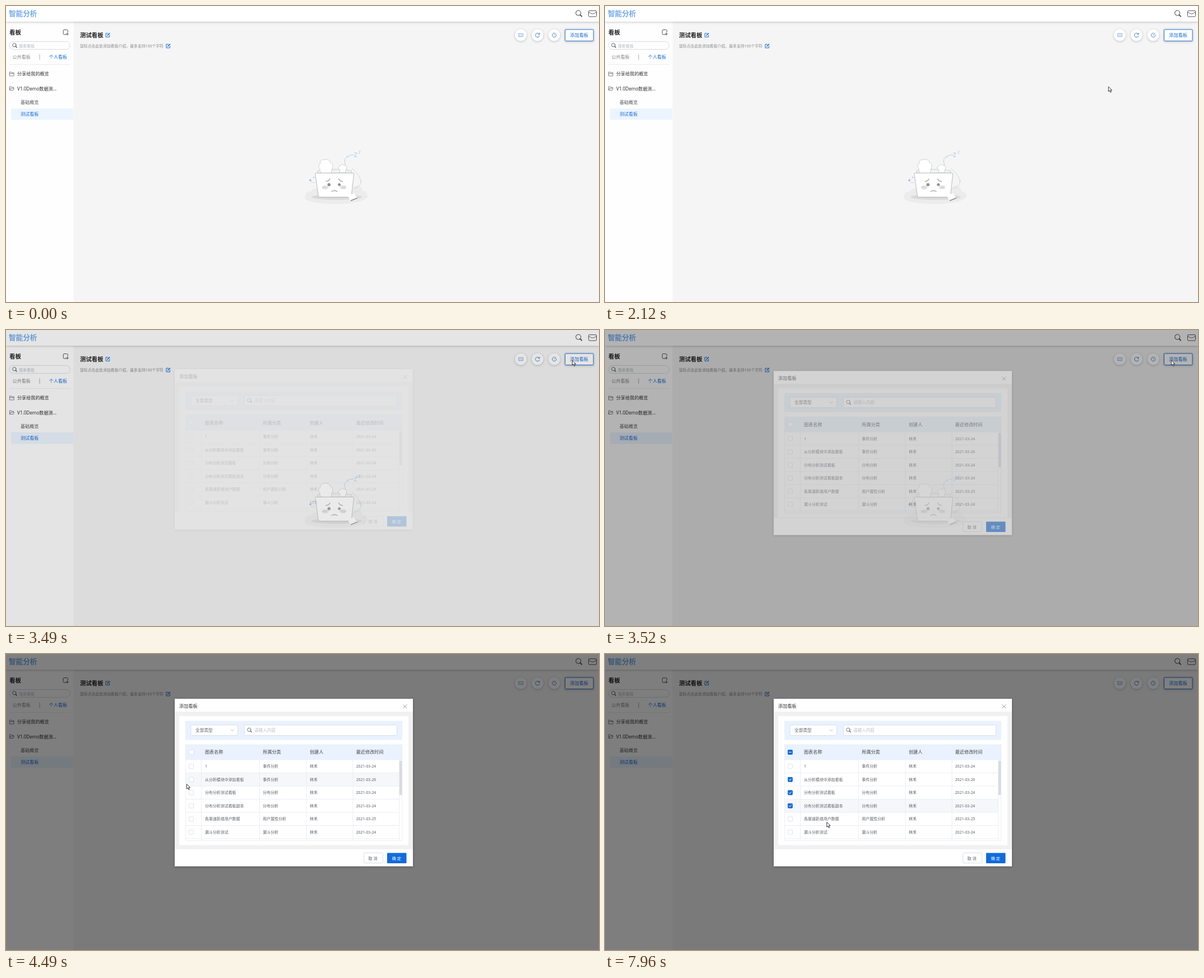
Write an HTML page that moves like this. It is 1058 by 529 pixels and loops after 8000 ms.

```html
<!DOCTYPE html>
<html lang="zh-CN">
<head>
<meta charset="utf-8">
<title>看板</title>
<style>
  html, body { margin: 0; width: 100%; height: 100%; overflow: hidden; background: #f5f5f5; }
  svg { display: block; width: 1058px; height: 529px; }
  text { font-family: "Noto Sans", "Noto Sans CJK SC", "Noto Sans CJK", sans-serif; white-space: pre; }
  .soft { filter: drop-shadow(0 1px 2px rgba(0, 0, 0, .22)); }
  #dialog { filter: drop-shadow(0 1px 2px rgba(0, 0, 0, .3)); }
  #halo { mix-blend-mode: multiply; }
</style>
</head>
<body>
<svg viewBox="0 0 1058 529" fill="none">
  <defs>
    <g id="lens" stroke-linecap="round"><circle r="3.2" cx="-.6" cy="-.7"/><path d="M1.8 1.7 3.6 3.5" stroke-width="1.5"/></g>
    <g id="edit" stroke="#1a6fd8"><path d="M.8-3.2H-3.4V3.4H3.2V-.4"/><path d="M-1 1 3.6-3.6" stroke-width="1.5"/></g>
  </defs>

  <g id="page">
    <path fill="#f5f5f5" d="M0 0H1058V529H0z"/>
    <path fill="#fefefe" d="M0 28H120.5V529H0z"/>
    <path class="soft" fill="#fff" d="M0 0H1058V28H0z"/>
    <path fill="#ecf5ff" d="M9 183H120V203.500H9z"/>
    <g stroke="#555">
      <use href="#lens" transform="translate(1022 13.500) scale(1.4)" stroke-width=".75"/>
      <rect x="1039.500" y="8.500" width="14" height="10.500" rx="1.500"/>
      <path d="M1039.500 11.500c3 0 3 2.500 7 2.500s4-2.500 7-2.500"/>
      <path d="M108 51h-4a1.800 1.800 0 0 1-1.800-1.800v-5A1.800 1.800 0 0 1 104 42.500h4.500a1.800 1.800 0 0 1 1.800 1.800V47M109.500 47.500v5M107 50h5"/>
      <use href="#lens" x="15.500" y="70.500" stroke-width=".9"/>
      <path stroke="#777" stroke-width=".9" d="M6.500 118h2.800l1 1.200h3.800v5.800H6.500zM6.500 120.800h7.500M6.500 150.500v-6.500h2.800l1 1.200h3V147M6.500 150.500l1.600-3.500h6.200l-1.500 3.500z"/>
    </g>
    <rect x="6" y="63.500" width="108.500" height="14" rx="7" stroke="#d9dce2"/>
    <path d="M60 86.500v9.500" stroke="#aaa"/>
    <path d="M6 104.500H115" stroke="#ececec"/>
    <use href="#edit" x="181.500" y="52"/>
    <use href="#edit" x="289.300" y="71.500"/>
    <g class="soft" fill="#fff">
      <circle cx="918.500" cy="52" r="10.500"/><circle cx="948.300" cy="52" r="10.500"/><circle cx="978.200" cy="52" r="10.500"/>
      <rect x="997.500" y="42" width="50.500" height="20.500" rx="1" stroke="#2472d6"/>
    </g>
    <g stroke="#2a75d8" stroke-width=".9">
      <rect x="914.700" y="49.300" width="7.600" height="5.400" stroke="#7aa9e6"/>
      <path stroke="#7aa9e6" stroke-dasharray="1 1" d="M916 51.300h5.500M916 53h5.500"/>
      <path d="M951.500 50.200a3.700 3.700 0 1 0 .5 2.600M952 48v2.500h-2.600"/>
      <path d="M979.500 48.700a3.600 3.600 0 1 0 2.200 2.500M977.800 52.300l3.600-3.600"/>
    </g>

    <g id="empty">
      <path fill="#ececec" d="M533 342c0-7 5-11 12-11 2-5 8-6 12-4h62c1-6 8-8 13-4 3 2 4 5 4 8 6 0 9 4 9 9-2 18-112 18-112 2z"/>
      <ellipse cx="590" cy="341.500" rx="45" ry="5" fill="#dadada"/>
      <g stroke="#c4c4c4" stroke-width=".8" fill="#fff">
        <path d="M556 300v-6h20l2-2h30l2 2h6l1 6z" fill="#eef2f6"/>
        <path d="M560 295l3 4h17l2-9c2-5 1-9-3-10-1-5-8-8-12-5-4-1-7 2-6 6-4 2-4 8-1 10z"/>
        <path d="M595 298l1-5c-4-2-4-6 0-7 1-3 6-3 7-1 4-1 6 3 4 6l-2 7z"/>
        <path d="M553.500 298.500h65.500q2 0 1.700 2l-4.400 39q-.3 2-2 2h-55q-1.700 0-2-2l-5.500-39q-.3-2 1.700-2z" stroke="#a9a9a9"/>
        <path d="M609 338l12-3 6 8-12 6z" stroke="none"/>
      </g>
      <path d="M615 348l12-5" stroke="#888" stroke-width="1.500"/>
      <path d="M606 285c-4-10-2-18 15-19M617 290c8 7 14 14 16 22 1 8-5 13-13 14" stroke="#c9ced3" stroke-width=".8"/>
      <path d="M606 285c-4-10-2-18 15-19" stroke="#a9cdea" stroke-width=".8" stroke-dasharray="2 2"/>
      <g stroke="#a0a0a0" stroke-width="1.300" stroke-linecap="round">
        <path d="M571 313.500q5 0 7-4.500M593.500 309q2 4.500 7 4.500M581 331.500q5-3 10 0"/>
      </g>
      <g fill="#909090"><circle cx="576.300" cy="319.300" r="2.800"/><circle cx="594.700" cy="319.300" r="2.500"/></g>
      <g fill="#e2e2e2"><ellipse cx="569.500" cy="324.300" rx="6" ry="3.500"/><ellipse cx="601.500" cy="324" rx="6" ry="3.500"/></g>
      <path d="M566 325l1-2M569 325l1-2M600 323l1 3M603 323l1 3" stroke="#bbb" stroke-width=".8"/>
      <path fill="#7dbdf0" d="M543 308.500l.8 2.200 2.200.8-2.200.8-.8 2.200-.8-2.200-2.200-.8 2.200-.8zM549 304.500l.5 1.200 1.300.5-1.300.5-.5 1.300-.5-1.300-1.200-.5 1.200-.5z"/>
      <path stroke="#d0d0d0" stroke-width=".8" d="M543 313q4 5 9 2"/>
      <circle cx="634" cy="313" r=".8" fill="#9cc7ec"/><circle cx="610" cy="270" r=".8" fill="#9cc7ec"/>
    </g>
  </g>

  <path id="shade" fill="#000" d="M0 0H1058V529H0z"/>

  <g id="dialog">
    <path fill="#fff" d="M301 80H726V349H301z"/>
    <path fill="#f1f1f1" d="M301 103H726V349H301z"/>
    <path fill="#fff" d="M309 111H718V341.500H309z"/>
    <path fill="#e9f2fe" d="M320 119.500H707V153.500H320zM320 161.500H707V189.500H320z"/>
    <g fill="#fff" stroke="#d8dde6" stroke-width=".9">
      <rect x="330" y="127" width="83.500" height="18.500" rx="1.500"/>
      <rect x="425.500" y="127" width="272" height="18.500" rx="1.500"/>
    </g>
    <path d="M401 135l2.700 2.700 2.700-2.700" stroke="#b5b9c2"/>
    <use href="#lens" x="434.500" y="136" stroke="#666" stroke-width=".9"/>
    <path d="M708.500 90.200l7 7M715.500 90.200l-7 7" stroke="#999"/>
    <g id="table"></g>
    <g id="foot">
      <path fill="#fff" d="M301 349H726V379.500H301z"/>
      <rect x="638.500" y="355.500" width="34" height="18" rx="1" stroke="#dcdfe6"/>
      <rect x="680" y="355.500" width="34.500" height="18.500" rx="1" fill="#126bdb"/>
    </g>
  </g>

  <circle id="halo" r="7.200" fill="#fdf03c"/>
  <path id="arrow" fill="#fff" stroke="#222" stroke-width=".9" stroke-linejoin="round" d="M.3.400V9l2-1.800 1.400 3.300 1.500-.7-1.400-3.100h2.900z"/>
  <path id="hand" fill="#fff" stroke="#111" stroke-width=".9" stroke-linejoin="round" d="M-.9 8.500V1.200Q0-.1.900 1.200V5q1-.7 1.600.3 1.100-.6 1.500.5 1.400-.4 1.500.9V10q0 1.500-1 2.500v1H-.7v-1L-3.600 8.700q.2-1.500 1.500-1z"/>
</svg>

<script>
const LOOP = 8000;
const $ = id => document.getElementById(id);

function add(parent, tag, attrs, content) {
  const el = document.createElementNS('http://www.w3.org/2000/svg', tag);
  for (const k in attrs) el.setAttribute(k, attrs[k]);
  if (content) el.textContent = content;
  parent.appendChild(el);
  return el;
}

// cy is the optical middle of the line
function label(parent, x, cy, str, size, fill, weight = 400) {
  add(parent, 'text', { x, y: cy + size * .37, 'font-size': size, fill, 'font-weight': weight }, str);
}

const page = $('page'), dialog = $('dialog'), foot = $('foot'), table = $('table');
[
  [5, 13.5, '智能分析', 12.6, '#74abec', 700],
  [6, 47.5, '看板', 10.5, '#222', 700],
  [23, 71, '搜索看板', 7, '#b4b8bf'],
  [11.5, 91, '公共看板', 8.1, '#888'],
  [76.8, 91, '个人看板', 8.1, '#1a6fd8'],
  [20, 121.5, '分享给我的概览', 8.1, '#333'],
  [20, 147.5, 'V1.0Demo数据测...', 8.15, '#333'],
  [26, 172, '基础概览', 8.1, '#555'],
  [26, 193, '测试看板', 8.1, '#1a6fd8'],
  [132, 52, '测试看板', 10.4, '#222', 700],
  [132, 71.5, '鼠标点击此处添加看板介绍，最多支持100个字符', 6.87, '#8c8c8c'],
  [1006.3, 52.3, '添加看板', 8.2, '#1a6fd8', 500]
].forEach(a => label(page, ...a));
label($('empty'), 621, 266.5, 'Z', 10, '#9fcbf0', 500);
label($('empty'), 629, 261.5, 'Z', 6.5, '#9fcbf0', 500);
label(dialog, 309, 93, '添加看板', 8.2, '#333');
label(dialog, 338, 136.3, '全部类型', 7.7, '#606266');
label(dialog, 443, 136.3, '请输入内容', 7.6, '#b9bdc6');
label(foot, 646.5, 365, '取 消', 7.2, '#606266');
label(foot, 688.7, 365, '确 定', 7.2, '#fff', 500);

const TOP = 189.5, ROW = 23.5, COLS = [355, 458.3, 542, 624.7];
const rows = [
  ['1', '事件分析', '24'],
  ['从分析模块中添加看板', '事件分析', '26'],
  ['分布分析测试看板', '分布分析', '24'],
  ['分布分析测试看板副本', '分布分析', '24'],
  ['各渠道新增用户数据', '用户属性分析', '25'],
  ['漏斗分析测试', '漏斗分析', '24']
];

function checkbox(cy, mark) {
  const box = add(table, 'rect', { x: 326.4, y: cy - 4, width: 8, height: 8, rx: 1, 'stroke-width': .9 });
  const sign = add(table, 'path', { d: mark, transform: `translate(330.4 ${cy})`, stroke: '#fff' });
  return (on, hot) => {
    box.setAttribute('fill', on ? '#126bdb' : '#fff');
    box.setAttribute('stroke', on || hot ? '#126bdb' : '#dcdfe6');
    sign.style.opacity = on ? 1 : 0;
  };
}

const bands = [], checks = [];
rows.forEach(([name, kind, day], i) => {
  const y = TOP + i * ROW, cy = y + 11.3;
  bands.push(add(table, 'rect', { x: 320.5, y, width: 381, height: ROW, fill: '#f5f7fa' }));
  add(table, 'path', { d: `M320 ${y + ROW - .5}H701.500`, stroke: '#e9ecf3', 'stroke-width': .9 });
  checks.push(checkbox(cy, 'M-2.300 0l1.700 1.800 2.900-3.500'));
  [name, kind, '林禾', '2021-03-' + day].forEach((s, c) =>
    label(table, COLS[c], cy, s, c < 3 ? 6.95 : 6.8, '#5c5f66'));
});
const checkAll = checkbox(175.5, 'M-2.300 0h4.600');
['图表名称', '所属分类', '创建人', '最近修改时间'].forEach((s, c) =>
  label(table, COLS[c], 175.5, s, 8.1, '#444'));
add(table, 'path', {
  d: 'M320.500 161.500V333.500H706.500V161.500' + [348.5, 452.5, 536, 619, 701.5].map(x => `M${x} 189.500V333`).join(''),
  stroke: '#e9ecf3', 'stroke-width': .9
});
add(table, 'rect', { x: 702, y: 190.5, width: 4.6, height: 61.5, rx: 1.5, fill: '#d8dbe2' });

// time, x, y
const path = [
  [400, 1043, 535], [780, 600, 330], [1210, 174, 202], [1500, 174, 202],
  [1820, 470, 187], [2120, 897, 144], [2310, 968, 106], [2860, 1010, 54], [3600, 1010, 54],
  [4100, 338, 200], [4490, 322, 232], [4600, 323, 235], [4830, 328, 224], [5120, 328, 224],
  [5490, 328, 247], [5900, 328, 247], [6320, 329, 272], [6850, 329, 272], [7170, 329, 274],
  [7600, 329, 274], [7700, 332, 277], [7860, 332, 277], [7960, 395, 300], [8000, 402, 302]
];
// time, shade, dialog opacity, dialog shift, footer shift
const opening = [
  [3430, 0, 0, -20, -13], [3490, .19, .2, -10, -13], [3550, .98, .72, -3.5, 0], [3640, 1, 1, 0, 0]
];
const clicks = [[3060, 3290], [4930, 5090], [5720, 5880], [6650, 6800]];
const checkedAt = [Infinity, 5090, 5880, 6800, Infinity, Infinity];
const hoverAt = [4120, 4230, 5300, 6120];

function find(keys, t) {
  let i = 0;
  while (i < keys.length - 2 && t >= keys[i + 1][0]) i++;
  const a = keys[i], b = keys[i + 1];
  return [i, Math.min(1, Math.max(0, (t - a[0]) / (b[0] - a[0])))];
}

function linear(keys, t) {
  const [i, u] = find(keys, t);
  return keys[i].map((v, k) => v + (keys[i + 1][k] - v) * u);
}

// Hermite curve that comes to rest wherever the position is held
function slope(i, k) {
  const p = path[i - 1], c = path[i], n = path[i + 1];
  if (!p || !n || (n[k] - c[k]) * (c[k] - p[k]) <= 0) return 0;
  return (n[k] - p[k]) / (n[0] - p[0]);
}
function pointer(t) {
  const [i, u] = find(path, t), a = path[i], b = path[i + 1], d = b[0] - a[0];
  const w = u * u * (3 - 2 * u);
  return [1, 2].map(k => a[k] + (b[k] - a[k]) * w
    + d * u * (1 - u) * ((1 - u) * slope(i, k) - u * slope(i + 1, k)));
}

const show = (el, on) => { el.style.display = on ? '' : 'none'; };

function draw(t) {
  const [, dark, alpha, shift, footShift] = linear(opening, t);
  $('shade').style.opacity = dark * .5;
  dialog.style.opacity = alpha;
  dialog.setAttribute('transform', `translate(0 ${shift})`);
  foot.setAttribute('transform', `translate(0 ${footShift})`);
  show(dialog, alpha > 0);

  const hover = hoverAt.filter(h => t >= h).length - 1;
  const isHand = t >= 4720 && t < 7870;
  bands.forEach((b, i) => show(b, i === hover));
  checks.forEach((set, i) => set(t >= checkedAt[i], isHand && i === hover));
  checkAll(t >= checkedAt[1]);

  const [x, y] = pointer(t), at = `translate(${x.toFixed(2)} ${y.toFixed(2)})`;
  for (const id of ['arrow', 'hand', 'halo']) $(id).setAttribute('transform', at);
  show($('arrow'), t >= 410 && !isHand);
  show($('hand'), isHand);
  show($('halo'), clicks.some(([a, b]) => t >= a && t < b));
}

const start = performance.now();
function tick() {
  draw((performance.now() - start) % LOOP);
  requestAnimationFrame(tick);
}
tick();
</script>
</body>
</html>
```
